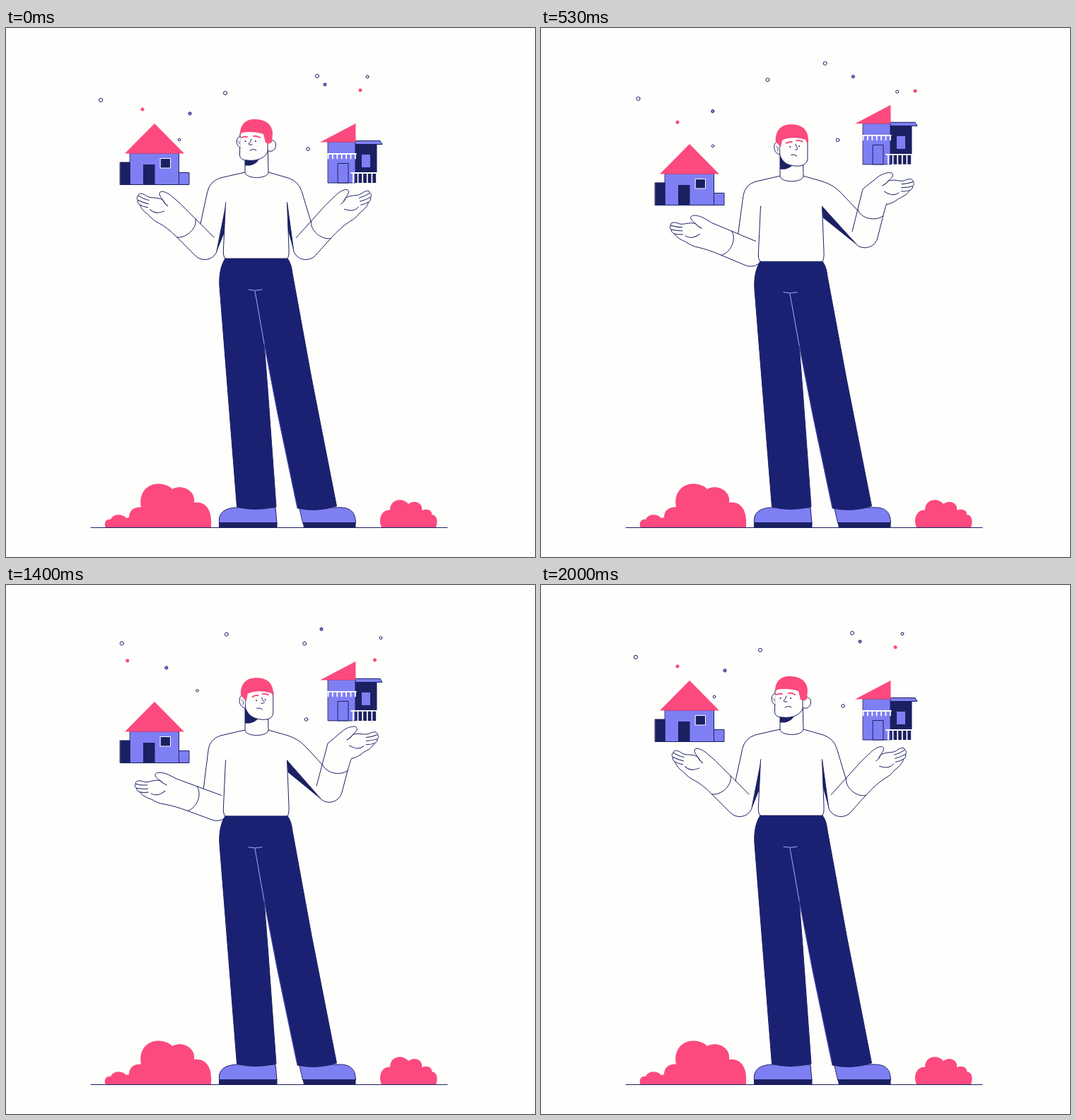
Animation of 748x748 px, one loop 2030 ms. Source, as an HTML page with a canvas:

```html
<!DOCTYPE html>
<html>
<head>
<meta charset="utf-8">
<style>
html, body { margin: 0; width: 100%; height: 100%; overflow: hidden; background: #fefefd; }
canvas { display: block; }
</style>
</head>
<body>
<canvas id="stage" width="748" height="748"></canvas>
<script>
const c = document.getElementById('stage').getContext('2d');
const WHITE = '#fefefd', NAVY = '#1b2062', DENIM = '#1b2172', LILAC = '#7f7ff4', PINK = '#fc4a7e';
const PERIOD = 2000, LOOP = 2030, DROP = 1335, MIRROR = 709, RAD = Math.PI / 180;

const lerp = (a, b, p) => a + (b - a) * p;
function ease(t, from, to) {
  const x = Math.min(1, Math.max(0, (t - from) / (to - from)));
  return x * x * (3 - 2 * x);
}
// Up during the first time span, down again after DROP
const hold = (t, up, down) => ease(t, 0, up) - ease(t, DROP, DROP + down);
const pulse = (t, start, peak, end) => ease(t, start, peak) - ease(t, peak, end);

// Blend two path strings of equal structure
function mix(a, b, p) {
  const nums = b.match(/[\d.]+/g);
  let i = 0;
  return a.replace(/[\d.]+/g, v => lerp(+v, +nums[i++], p));
}

function shape(d, fill, stroke, width = 1) {
  const path = new Path2D(d);
  if (fill) { c.fillStyle = fill; c.fill(path); }
  if (stroke) { c.strokeStyle = stroke; c.lineWidth = width; c.stroke(path); }
}
const box = (x, y, x2, y2, fill, stroke) => shape(`M${x},${y}H${x2}V${y2}H${x}Z`, fill, stroke);

function disc(x, y, r, fill, stroke) {
  c.beginPath();
  c.arc(x, y, r, 0, 7);
  c.fillStyle = fill;
  c.fill();
  if (stroke) { c.strokeStyle = stroke; c.lineWidth = 1; c.stroke(); }
}

function at(x, y, angle, draw) {
  c.save();
  c.translate(x, y);
  c.rotate(angle);
  draw();
  c.restore();
}

function ground() {
  shape(`M140.5,706C138,699 142,694 148,695C151,687 164,686 170,693L174,692C174,682 181,677 191,677.5
    C187,657 200,645 214,644.5C223,644.5 231,647 235,652C248,644 269,654 266,671C283,669 292,682 290,706Z`, PINK);
  shape(`M531,706C526,694 531,681 543,681.5C543,666 561,663 569,673C578,666 590,672 588,682
    C595,679 603,682 602,688C610,689 611,698 608,706Z`, PINK);
  shape('M120,706.5H624', null, NAVY);
}

function shoes() {
  shape('M301.5,700C300,686 308,679 326,678H381L383,700Z', LILAC, NAVY);
  box(301, 699, 383.5, 706.5, NAVY);
  shape('M415,678H468C487,677 494,684 494.5,700H420Z', LILAC, NAVY);
  shape('M419.5,699H494.5V706.5H421Z', NAVY);
}

// The waist follows the body while the hems stay on the ground
function trousers(d) {
  const w = .8 * d, k = .7 * d, m = .5 * d;
  shape(`M310,${326 + w}H398C402,${331 + w} 404,${338 + w} 405,${347 + w}L432,${495 + m / 2}L467.5,676
    Q440,685 412,679L384,${545 + m / 2}L365,${446 + m}L370,${510 + m / 2}L382,677Q350,684 326.5,677
    L302,${366 + k}C301,${352 + w} 303,${336 + w} 310,${326 + w}Z`, DENIM, NAVY);
  shape(`M343,${370 + k}Q352,${372.5 + k} 362,${370 + k}M352,${372 + k}L365,${446 + m}`, null, '#a9a9f6');
  shape(`M365,${446 + m}L384,${545 + m / 2}L412,679`, null, LILAC, .6);
}

// Poses are [rest, raised]; the left arm is drawn mirrored
const RIGHT = {
  up: 500, down: 645, cuff: 32, meet: 31, shoulder: 414, flick: -21,
  x: [424, 458], y: [309, 287], fore: [-48, -76], hand: [0, 14]
};
const LEFT = {
  up: 700, down: 500, cuff: 37, meet: 27, shoulder: 421, flick: 18,
  x: [428, 410], y: [309, 314], fore: [-45, -19], hand: [2, 18]
};

function arm(side, t, d, swing) {
  const p = hold(t, side.up, side.down);
  const pose = key => lerp(...side[key], p);
  const ex = pose('x'), ey = pose('y') + d, a = pose('fore') * RAD;
  const tilt = (pose('hand') + side.flick * swing) * RAD - a;
  const r = 18.5, cuff = side.cuff, pit = [397.5, 247 + d];
  const bend = Math.atan2(ey - pit[1], ex - pit[0]) + Math.PI / 2;
  const forearm = draw => at(ex, ey, a, draw);
  const hand = draw => forearm(() => at(62, -4, tilt, () => { c.translate(22, -28); draw(); }));
  c.strokeStyle = NAVY;
  c.lineWidth = 1;

  // Shoulder and outer upper arm
  const mx = ex + side.meet * Math.cos(a) + r * Math.sin(a);
  const my = ey + side.meet * Math.sin(a) - r * Math.cos(a);
  const sx = side.shoulder, sy = 217 + d, len = Math.hypot(mx - sx, my - sy) / 15;
  c.beginPath();
  c.moveTo(371, 204 + d);
  c.lineTo(sx - 15, sy - 5);
  c.quadraticCurveTo(sx, sy, sx + (mx - sx) / len, sy + (my - sy) / len);
  c.lineTo(mx, my);
  c.stroke();

  // Armpit shade
  c.beginPath();
  c.moveTo(...pit);
  c.lineTo(ex + r * Math.cos(bend), ey + r * Math.sin(bend));
  c.lineTo(398.5, ey - 24);
  c.fillStyle = NAVY;
  c.fill();

  // Hand
  c.fillStyle = WHITE;
  c.beginPath();
  forearm(() => { c.moveTo(cuff, -r); c.lineTo(cuff + 30, -r); });
  hand(() => {
    c.lineTo(-18, 4);
    c.bezierCurveTo(-12, -2, -1, -7, 0, -1);
    c.bezierCurveTo(0, 4, -6, 9, -7, 13);
    c.lineTo(-4, 8);
    c.bezierCurveTo(4, 3, 12, 6, 18, 2);
    c.bezierCurveTo(24, -3, 30, -3, 30, 1);
    c.bezierCurveTo(33, 3, 32, 6, 31, 7);
    c.bezierCurveTo(32, 10, 30, 13, 28, 14);
    c.bezierCurveTo(27, 20, 20, 26, 16, 29);
    c.bezierCurveTo(12, 34, 8, 38, 2, 41);
  });
  forearm(() => c.quadraticCurveTo(cuff + 22, r, cuff, r));
  c.fill();
  c.stroke();
  hand(() => shape('M30,1Q23,6 15,8M31,7Q24,11 16,13M28,14Q23,17 17,18M-7,13L-11,17M-6,24Q7,29 14,21', null, NAVY));

  // Sleeve
  c.fillStyle = WHITE;
  c.beginPath();
  forearm(() => {
    c.moveTo(0, -r);
    c.lineTo(cuff, -r);
    c.bezierCurveTo(cuff - 11, -r + 7, cuff - 11, r - 9, cuff, r);
    c.lineTo(0, r);
    c.arc(0, 0, r, Math.PI / 2, bend - a);
  });
  c.lineTo(...pit);
  c.fill();
  c.stroke();
}

function torso(d) {
  const w = .8 * d;
  const side = `M310.5,${247 + d}L307.5,${312 + w}Q306.5,${323 + w} 310,${326 + w}`;
  shape(side + `H398Q400.5,${323 + w} 400,${312 + w}L397.5,${247 + d}Z`, WHITE);
  shape(side + `M397.5,${247 + d}L400,${312 + w}Q400.5,${323 + w} 398,${326 + w}`, null, NAVY);
}

function head(d, turn, shut) {
  const blend = (a, b) => mix(a, b, turn);
  c.save();
  c.translate(0, d);
  shape('M338,170V204C339,214 370,214 371,204L370,165', WHITE, NAVY);
  shape('M338,172V194.5C350,195.5 357,190 359,182Z', NAVY);
  c.translate(0, .2 * d + turn);
  // Far ear, face, near ear
  shape(blend('M369,161C373,156 382,158 381.5,166C381,174 374,176 369,173',
              'M356,161C360,156 366,158 366,166C366,174 361,176 356,173'), WHITE, NAVY);
  shape(blend('M331,149L330.5,178C330,184 334,187 341,187C355,189 368,183 370,174L370,150',
              'M338,158L339,172C343,182 350,187 362,188C374,189 378,184 378,178L378,149'), WHITE, NAVY);
  shape(blend('M331.5,154C325,152 324,167 331,169', 'M338,153C328,151 327,170 338,172'), WHITE, NAVY);
  shape(blend('M329,160Q330,161 330,164', 'M333,160Q338,162 335,167'), null, NAVY, .8);
  // Hair
  shape(blend('M331,150C331,137 338,129 351,129C367,129 376,136 377,148L376,161C374,164 370,164 367,162L364,150C356,147 342,146 334,148L332,150Z',
              'M332,154C331,137 340,129 354,129C369,129 377,136 378,149L378,154C378,154 377,154 377,154L376,151C366,147 350,147 342,152L340,163L333,160Z'), PINK);
  // Brows, eyes, nose, mouth
  shape(blend('M333,155Q336,153 341,154M350,153Q354,152 359,155',
              'M349,156Q352,153 357,154M363,152Q367,151 371,153'), null, PINK, 2);
  if (shut) {
    shape(blend('M335,159H341M350,159H357', 'M350,159H357M363,159H370'), null, '#b9a3c8', .7);
  } else {
    disc(338.5 + 16 * turn, 160 + turn, 1, NAVY);
    disc(353 + 14 * turn, 160, 1, NAVY);
  }
  shape(blend('M347,157Q346,161 343,164Q344,166 348,165', 'M362,157Q363,161 366,163Q365,166 361,165'), null, NAVY);
  shape(blend('M345,173Q350,170 354,173', 'M355,172Q360,171 363,174'), null, NAVY);
  c.restore();
}

function cottage() {
  box(161.5, 190, 176, 221.5, NAVY, NAVY);
  box(244, 204.5, 259, 221.5, LILAC, NAVY);
  box(175.5, 177, 244.5, 221.5, LILAC, NAVY);
  box(194, 193, 210.5, 221, NAVY);
  box(218.5, 184.5, 232.5, 198, NAVY, WHITE);
  shape('M168,177.5L210,135L252,177.5Z', PINK);
}

function villa() {
  box(494, 163, 524.5, 219, NAVY);
  box(503, 179, 515, 197, LILAC);
  shape('M494,159.5H529L532,164.5H494Z', LILAC, NAVY);
  box(455.5, 161, 494, 219, LILAC, NAVY);
  box(469.5, 191.5, 484, 219, LILAC, NAVY);
  shape('M444,161.5L494.5,135V161.5Z', PINK);
  let trim = 'M454,178H495M488,205H526';
  for (let i = 0; i < 7; i++) trim += `M${455.5 + 6.4 * i},178v6.5`;
  for (let i = 0; i < 6; i++) trim += `M${491 + 6.6 * i},205v14`;
  shape(trim, null, WHITE, 1.8);
}

// Each dot circles its home on an ellipse: x, y, then its cosine and sine swing
const dot = (t, r, fill, x, y, cx, cy, sx, sy) => {
  const a = t / PERIOD * 2 * Math.PI, cos = Math.cos(a), sin = Math.sin(a);
  disc(x + cx * cos + sx * sin, y + cy * cos + sy * sin, r, fill, fill === PINK ? null : NAVY);
};

function dots(t) {
  dot(t, 2.6, WHITE, 148, 93, -14, 9, -12, 8);
  dot(t, 2.5, PINK, 184, 119, 9, -4, 10, 14);
  dot(t, 2.1, LILAC, 239, 118, 21, 3, 6, 0);
  dot(t, 1.8, WHITE, 255, 158, -10, 0, -13, 9);
  dot(t, 2.5, WHITE, 315, 75, -5, 17, 5, 0);
  dot(t, 2.5, WHITE, 417, 67, 23, 1, -13, -17);
  dot(t, 2, LILAC, 445, 68, 6, 12, -3, 2);
  dot(t, 2, WHITE, 516, 80, -5, -11, -13, 9);
  dot(t, 2.5, PINK, 521, 96, -20, -8, 6, -8);
  dot(t, 2.3, WHITE, 423, 174, 4, -3, -3, -16);
}

function render(t) {
  const swing = pulse(t, DROP, 1660, 1980);
  const dip = pulse(t, 0, 340, 740) + swing;
  const lift = hold(t, 633, 600), turn = hold(t, 690, 645), d = 10 * dip;
  c.fillStyle = WHITE;
  c.fillRect(0, 0, 748, 748);
  c.lineJoin = c.lineCap = 'round';
  ground();
  shoes();
  arm(RIGHT, t, d, swing);
  c.save();
  c.translate(MIRROR, 0);
  c.scale(-1, 1);
  arm(LEFT, t, d, swing);
  c.restore();
  torso(d);
  trousers(d);
  head(d, turn, dip > .8);
  at(0, 31 * lift, 0, cottage);
  at(0, -28 * lift, 0, villa);
  dots(t);
}

// The picture advances at 30 steps a second
function tick() {
  const step = Math.floor((performance.now() % LOOP + 5) * .03);
  render(Math.min(step, 60) % 60 * 100 / 3);
  requestAnimationFrame(tick);
}
tick();
</script>
</body>
</html>
```
